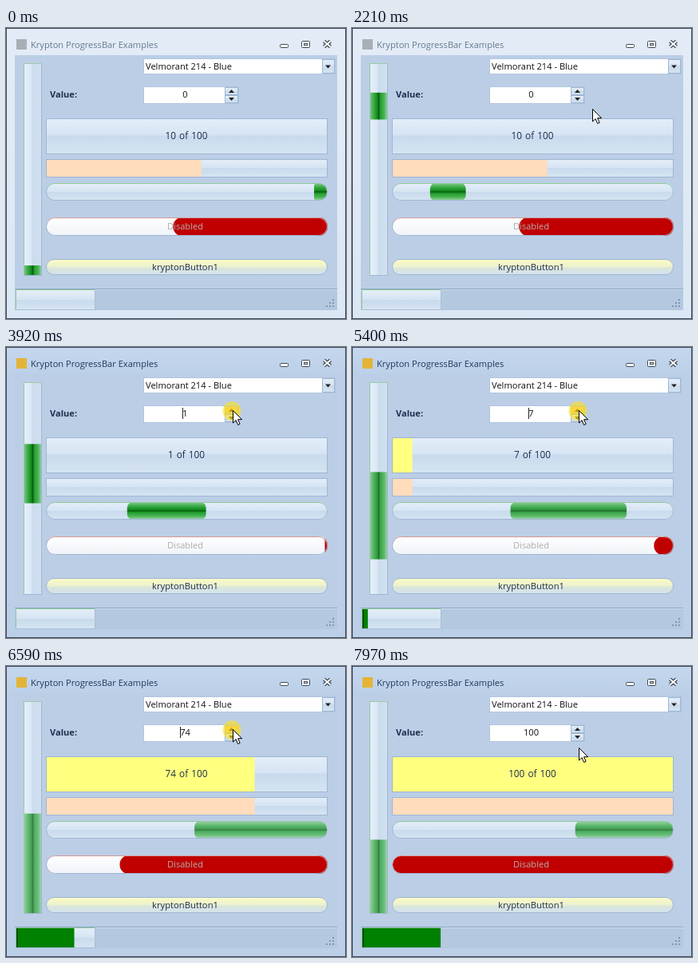
Write an HTML page that moves like this. It is 426x364 px and loops after 8 s.

```html
<!DOCTYPE html>
<html lang="en">
<head>
<meta charset="utf-8">
<title>Progress bars</title>
<style>
html, body { margin: 0; width: 100%; height: 100%; overflow: hidden; background: #bbcee6; }
svg { display: block; width: 426px; height: 364px; }
text { font: 11.1px "Open Sans", "Noto Sans", sans-serif; fill: #1e2f4d; }
.mid { text-anchor: middle; }
.edge { fill: none; stroke: #9fb6d3; }
.black { fill: #101010; }
.glyph { fill: #fff; stroke: #3d4856; }
</style>
</head>
<body>
<svg viewBox="0 0 426 364">
  <defs>
    <linearGradient id="glass" x2="0" y2="1">
      <stop offset="0" stop-color="#e4eef9"/><stop offset=".48" stop-color="#d6e4f3"/>
      <stop offset=".5" stop-color="#c8daed"/><stop offset="1" stop-color="#d5e4f1"/>
    </linearGradient>
    <linearGradient id="glassV">
      <stop offset="0" stop-color="#e6f0fa"/><stop offset=".4" stop-color="#dce8f5"/>
      <stop offset=".5" stop-color="#cbdcee"/><stop offset="1" stop-color="#d2e1f0"/>
    </linearGradient>
    <linearGradient id="pale" x2="0" y2="1">
      <stop offset="0" stop-color="#fff"/><stop offset="1" stop-color="#eff3f8"/>
    </linearGradient>
    <linearGradient id="lemon" x2="0" y2="1">
      <stop offset="0" stop-color="#fbfbc6"/><stop offset=".45" stop-color="#eef2cc"/>
      <stop offset=".6" stop-color="#d9e5dc"/><stop offset="1" stop-color="#d4e3ee"/>
    </linearGradient>
    <linearGradient id="green" x2="0" y2="1">
      <stop offset="0" stop-color="#86c88c"/><stop offset=".25" stop-color="#35a842"/>
      <stop offset=".43" stop-color="#128a1d"/><stop offset=".5" stop-color="#075c0d"/>
      <stop offset=".58" stop-color="#209c2c"/><stop offset=".8" stop-color="#4bb456"/>
      <stop offset="1" stop-color="#a3d5a9"/>
    </linearGradient>
    <linearGradient id="greenV" href="#green" x2="1" y2="0"/>
    <linearGradient id="leafEdge" x2="0" y2="1">
      <stop offset="0" stop-color="#8fcb98"/><stop offset=".6" stop-color="#9fb6d3"/>
    </linearGradient>
    <linearGradient id="roseEdge" x2="0" y2="1">
      <stop offset="0" stop-color="#d49a9a"/><stop offset=".6" stop-color="#9fb6d3"/>
    </linearGradient>
    <linearGradient id="idle" x2="0" y2="1">
      <stop offset="0" stop-color="#e3ecf6"/><stop offset="1" stop-color="#dbe7f4"/>
    </linearGradient>
    <linearGradient id="live" x2="0" y2="1">
      <stop offset="0" stop-color="#c4d7ed"/><stop offset=".1" stop-color="#bbcfe8"/>
      <stop offset="1" stop-color="#bbcfe8"/>
    </linearGradient>
    <clipPath id="pill"><rect x="51" y="194" width="352" height="22" rx="11"/></clipPath>
    <clipPath id="pill2"><rect x="51" y="237" width="352" height="23" rx="11"/></clipPath>
  </defs>

  <rect id="frame" x=".5" y=".5" width="425" height="363" stroke="#3b4757"/>
  <rect id="icon" x="13" y="14" width="13" height="13"/>
  <text id="title" x="31" y="25">Krypton ProgressBar Examples</text>
  <rect class="glyph" x="343.5" y="20.5" width="10" height="4" rx="1"/>
  <rect class="glyph" x="370.5" y="16.5" width="10" height="8" rx="1"/>
  <rect x="373.5" y="19.5" width="4" height="2" fill="none" stroke="#3d4856"/>
  <path d="M398.500 16.500l8 7m0-7l-8 7" stroke="#3d4856" stroke-width="4.500"/>
  <path d="M398.500 16.500l8 7m0-7l-8 7" stroke="#fff" stroke-width="2"/>

  <rect x="11" y="34" width="404" height="319" fill="#bbcee6"/>
  <rect x="11" y="326" width="404" height="27" fill="#b4c8df"/>
  <path d="M11 326.500h404" stroke="#8ba4c4"/>
  <path d="M11 327.500h404" stroke="#d2e0f0"/>
  <g id="grip" fill="#8098b6"></g>

  <rect x="172.500" y="38.500" width="240" height="19" fill="#fff" stroke="#b1c5de"/>
  <text class="black" x="175" y="52">Velmorant 214 - Blue</text>
  <rect x="396.500" y="39.500" width="15" height="17" fill="url(#glass)" stroke="#9fb6d3"/>
  <path d="M400 46.500h7l-3.500 4z" fill="#222"/>

  <text x="55" y="87" font-weight="700" style="font-weight:700">Value:</text>
  <rect x="172.500" y="73.500" width="119" height="21" fill="#fff" stroke="#b1c5de"/>
  <rect id="up" x="274.500" y="74.500" width="16" height="9" stroke="#9fb6d3"/>
  <rect x="274.500" y="84.500" width="16" height="9" fill="url(#glass)" stroke="#9fb6d3"/>
  <path d="M279 81h7l-3.500-4zM279 87h7l-3.500 4z" fill="#222"/>
  <text id="num" class="mid black" x="224.500" y="87"></text>
  <path id="caret" stroke="#222"/>

  <rect x="22" y="44" width="23" height="265" fill="url(#glassV)"/>
  <rect id="tall" x="22" width="23" fill="url(#greenV)"/>
  <rect class="edge" x="22.500" y="44.500" width="22" height="265"/>
  <path d="M22.500 309v-264.500h22" fill="none" stroke="#9ccca6"/>

  <rect x="51" y="113" width="352" height="44" fill="url(#glass)"/>
  <rect id="yellow" x="51" y="113" height="44" fill="#ffff80"/>
  <rect class="edge" x="50.500" y="113.500" width="352" height="44"/>
  <text id="count" class="mid" x="226" y="139" style="font-size:11.800px;word-spacing:1px"></text>

  <rect x="51" y="164" width="352" height="22" fill="url(#glass)"/>
  <rect id="peach" x="51" y="164" height="22" fill="#ffdcbc"/>
  <rect class="edge" x="50.500" y="164.500" width="352" height="22"/>

  <rect x="51" y="194" width="352" height="22" rx="11" fill="url(#glass)"/>
  <g clip-path="url(#pill)"><rect id="wide" y="194" height="22" fill="url(#green)"/></g>
  <rect x="50.500" y="194.500" width="352" height="21" rx="10.500" fill="none" stroke="url(#leafEdge)"/>

  <rect x="51" y="237" width="352" height="23" rx="11" fill="url(#pale)"/>
  <g clip-path="url(#pill2)"><rect id="red" y="237" height="23" fill="#c00000"/></g>
  <rect x="50.500" y="237.500" width="352" height="22" rx="11" fill="none" stroke="url(#roseEdge)"/>
  <text class="mid" x="224.500" y="252" style="fill:#b2acac">Disabled</text>

  <rect x="50.500" y="289.500" width="352" height="19" rx="9.500" fill="url(#lemon)" stroke="#9fb6d3"/>
  <text class="mid" x="224.500" y="303" style="font-size:11.250px">kryptonButton1</text>

  <rect x="13" y="328" width="98" height="24" fill="url(#glass)"/>
  <rect id="strip" x="13" y="328" height="24" fill="#008000"/>
  <path id="stripEdge" d="M14 328v24" stroke="#004a00" stroke-width="2"/>
  <path d="M12.500 352v-24.500h99" fill="none" stroke="#8fcb98"/>
  <path d="M111.500 328v24.500h-99" fill="none" stroke="#a9bfd9"/>

  <ellipse id="glow" cx="283" cy="80" rx="11.500" ry="12" fill="#ffe01c" opacity=".62"/>
  <path id="cursor" d="M.5.500v15.500l3.600-3.400 2.500 5.900 2.500-1.100-2.500-5.700h5z" fill="#fff" stroke="#000"/>
</svg>
<script>
const LOOP = 8000, PRESS = 3900, RELEASE = 7150, BAR = 352;
const $ = id => document.getElementById(id);
const set = (id, attrs) => {
  for (const k in attrs) $(id).setAttribute(k, attrs[k]);
};
const show = (id, on) => set(id, { visibility: on ? 'visible' : 'hidden' });

// time, x, y of the pointer tip
const PATH = [
  [450, 400, 366], [700, 390, 325], [880, 374, 243], [950, 369, 237],
  [1720, 317, 150], [2210, 301, 101], [2560, 289, 80], [2800, 284, 79],
  [7550, 284, 79], [7850, 284, 102]
];

function pointer(t) {
  const i = PATH.findIndex(p => p[0] > t);
  if (i < 0) return PATH[PATH.length - 1].slice(1);
  if (i === 0) return [430, 370];
  const [a, b] = [PATH[i - 1], PATH[i]];
  const k = (t - a[0]) / (b[0] - a[0]);
  return [1, 2].map(n => a[n] + (b[n] - a[n]) * k);
}

// Held spin button: each wait is 70% of the one before
function spin(t) {
  if (t < PRESS) return 0;
  let n = 1, wait = 500, at = PRESS + wait;
  while (at <= t && n < 100) {
    n++;
    wait = Math.max(16.9, wait * 0.7);
    at += wait;
  }
  return n;
}

// Marquee block as fractions of its track
function marquee(t) {
  const start = t < 600 ? 0.9545 + t * 0.0000897 : 0.0227 + (t - 950) * 0.0000897;
  const a = Math.min(1, Math.max(0, start));
  const b = Math.min(1, 2 * start - 0.0085);
  return [a, Math.max(0, b - a)];
}

function draw(t) {
  const active = t >= PRESS - 30;
  const held = t >= PRESS - 30 && t < RELEASE;
  const n = spin(t);

  set('frame', { fill: active ? 'url(#live)' : 'url(#idle)' });
  set('icon', { fill: active ? '#e3b437' : '#a9afb7' });
  $('title').style.fill = active ? '#1e395b' : '#66788f';

  const [a, len] = marquee(t);
  const fade = len > 0 && t > 4000 ? 1 - Math.min(0.25, (t - 4000) / 10000) : 1;
  set('wide', { x: 50 + a * BAR, width: len * BAR, rx: Math.min(7, len * BAR / 4), opacity: fade });
  set('tall', { y: 45 + a * 264, height: len * 264, opacity: fade });

  const value = active ? n : 55;
  const w = value / 100 * BAR;
  set('yellow', { width: active && n > 1 ? w : 0 });
  set('peach', { width: active && n < 2 ? 0 : w });
  set('red', { x: 403 - w, width: w + (value > 20 ? 11 : 0), rx: Math.min(11, w / 2) });
  set('strip', { width: n > 1 ? n * 0.98 : 0 });
  show('stripEdge', n > 1);

  $('num').textContent = n;
  $('count').textContent = (active ? Math.max(1, n) : 10) + ' of 100';
  const cx = Math.round(224.5 - 3.2 * String(n).length) + 0.5;
  set('caret', { d: `M${cx} 76v14` });
  show('caret', active && t < 7560);

  set('up', { fill: held ? '#ffc56b' : 'url(#glass)' });
  show('glow', held);
  set('cursor', { transform: `translate(${pointer(t).map(Math.round)})` });
}

let dots = '';
for (let row = 0; row < 3; row++)
  for (let col = 0; col <= row; col++)
    dots += `<rect x="${409 - col * 4}" y="${339 + row * 4}" width="2" height="2"/>`;
$('grip').innerHTML = dots;

const begin = performance.now();
function tick() {
  draw((performance.now() - begin) % LOOP);
  requestAnimationFrame(tick);
}
tick();
</script>
</body>
</html>
```
